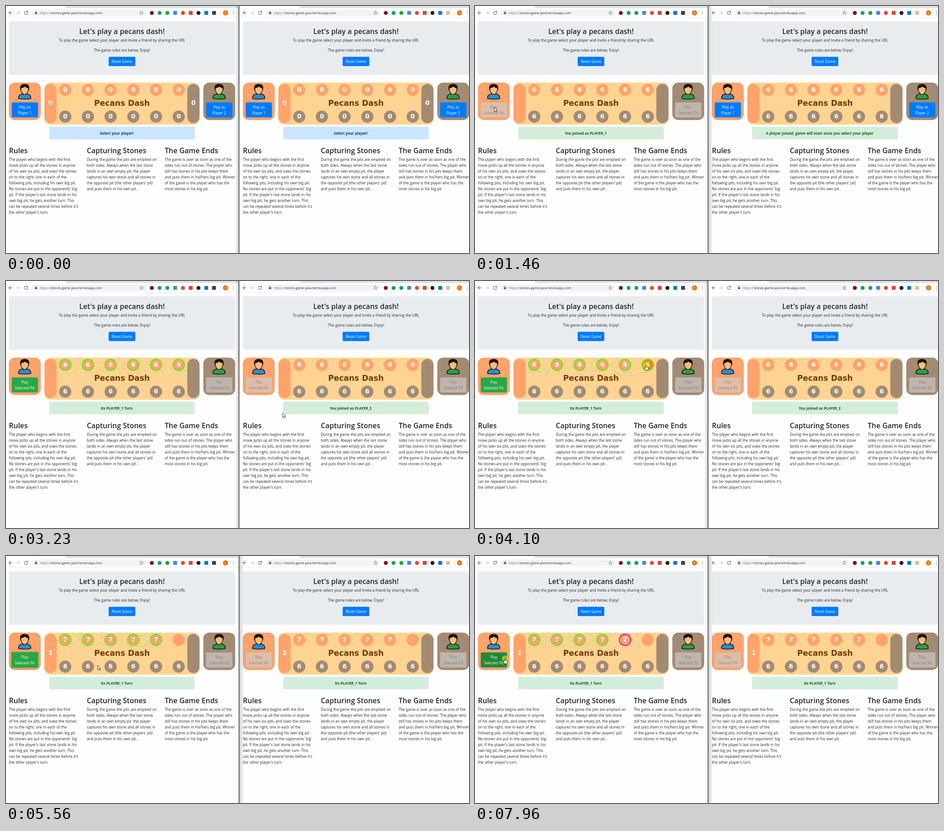
Write an HTML page with a canvas that moves like this. It is 1024x547 px and loops after 8000 ms.

```html
<!DOCTYPE html>
<html lang="en">
<head>
<meta charset="utf-8">
<style>
  html, body { margin: 0; width: 100%; height: 100%; overflow: hidden; background: #fefefe; }
  canvas { display: block; width: 1024px; height: 547px; }
</style>
</head>
<body>
<canvas id="stage" width="1024" height="547"></canvas>
<script>
const g = document.getElementById('stage').getContext('2d');
const LOOP = 8000, PANE = 517.5, TICK = 78.4;
const SANS = '"Open Sans", "Noto Sans", sans-serif';
const WIDE = '"DejaVu Sans", Verdana, sans-serif';
const ORANGE = '#ffa36b', BROWN = '#a38b73', INK = '#212529';
const BODY = 8.08;
const PITS = Array.from({ length: 6 }, (_, i) => 131 + 50.2 * i);

// Moments of the story, in ms
const CLICK = { join1: 1060, join2: 2610, pit6: 4020, play: 5060, pit5: 6790, again: 7960 };
const JOINED = 1460, STARTED = 2930, MOVED = 5300, REACT = 90;

// Pointer moves: start, end and where each one comes to rest
const MOVES = [
  { from: 120, to: 910, x: 43, y: 224 },
  { from: 1690, to: 2530, x: 985, y: 232, sag: 36 },
  { from: 3010, to: 3230, x: 613, y: 293 },
  { from: 3230, to: 3890, x: 378, y: 186 },
  { from: 4250, to: 5000, x: 64, y: 238 },
  { from: 5330, to: 6010, x: 731, y: 257 },
  { from: 6010, to: 6700, x: 327, y: 184 },
  { from: 7020, to: 7560, x: 66, y: 227 }
];

const COLUMNS = [
  ['Rules', ['The player who begins with the first', 'move picks up all the stones in anyone',
    'of his own six pits, and sows the stones', 'on to the right, one in each of the',
    'following pits, including his own big pit.', "No stones are put in the opponents' big",
    "pit. If the player's last stone lands in his", 'own big pit, he gets another turn. This',
    "can be repeated several times before it's", "the other player's turn."]],
  ['Capturing Stones', ['During the game the pits are emptied on', 'both sides. Always when the last stone',
    'lands in an own empty pit, the player', 'captures his own stone and all stones in',
    "the opposite pit (the other players' pit)", 'and puts them in his own pit. .']],
  ['The Game Ends', ['The game is over as soon as one of the', 'sides run out of stones. The player who',
    'still has stones in his pits keeps them', 'and puts them in his/hers big pit. Winner',
    'of the game is the player who has the', 'most stones in his big pit.']]];

const between = (t, a, b) => t >= a && t < b;

function paint(path, fill, stroke, line) {
  if (fill) { g.fillStyle = fill; g.fill(path); }
  if (stroke) { g.strokeStyle = stroke; g.lineWidth = line; g.stroke(path); }
}

function box(x, y, w, h, r, fill, stroke, line = 0.6) {
  const p = new Path2D();
  p.roundRect(x, y, w, h, r);
  paint(p, fill, stroke, line);
}

function disc(x, y, r, fill, stroke, line = 2.1) {
  const p = new Path2D();
  p.arc(x, y, r, 0, 7);
  paint(p, fill, stroke, line);
}

function shape(d, fill, stroke, line) {
  paint(new Path2D(d), fill, stroke, line);
}

function text(s, x, y, size = BODY, color = INK, align = 'left', weight = 400, family = SANS) {
  g.font = `${weight} ${size}px ${family}`;
  g.wordSpacing = '0.26px';
  g.fillStyle = color;
  g.textAlign = align;
  g.fillText(s, x, y);
}

function pointerAt(time) {
  const t = 120 + Math.floor((time - 120) / TICK + 0.35) * TICK;
  let x = 905, y = 560;
  for (const m of MOVES) {
    if (t < m.from) break;
    const u = Math.min(1, (t - m.from) / (m.to - m.from));
    const ease = u * u * (3 - 2 * u);
    x += (m.x - x) * ease;
    y += (m.y - y) * ease + (m.sag || 0) * Math.sin(Math.PI * u);
  }
  return { x, y };
}

function toolbar(right) {
  g.fillStyle = '#fff';
  g.fillRect(0, 0, 520, 25);
  g.fillStyle = '#dee1e6';
  g.fillRect(132, 0, 390, 4.5);
  g.fillRect(0, 24.8, 520, 0.6);
  g.lineCap = 'round';
  shape('M14 15H7M10 11.7L6.7 15L10 18.3', null, '#5f6368', 1.1);
  shape('M23 15H30M27 11.7L30.3 15L27 18.3', null, '#c4c6c9', 1.1);
  shape('M47.2 13A3.6 3.6 0 1 0 47.8 16M48 11V13.8H45.2', null, '#5f6368', 1.1);
  box(57, 8, 253, 14, 7, '#f1f3f4');
  box(64, 14, 5, 4, 0.5, '#5f6368');
  shape('M65 14V13A1.5 1.5 0 0 1 68 13V14', null, '#5f6368', 0.8);
  text('https://', 74.5, 18, 7.2, '#70757a');
  text('stones-game-java.herokuapp.com', 74.5 + g.measureText('https://').width, 18, 7.2, '#2b2e32');
  shape('M299.5 11L300.6 13.8L303.6 14L301.3 15.9L302 18.8L299.5 17.2L297 18.8L297.7 15.9L295.4 14L298.4 13.8Z',
    null, '#5f6368', 0.7);
  const marks = ['#7d1515', '#12a35f', '#16a64a', '#4a86e0', '#e8472b', '#db4035', '#222', '#0a7bc2',
    right ? '#e3bf94' : '#4a3658'];
  marks.forEach((c, i) => {
    const x = 322.5 + i * 17.2;
    if ([3, 5, 7, 8].includes(i)) box(x - 4.3, 11, 8.6, 8.6, 1, c);
    else disc(x, 15.3, 4.4, c);
  });
  g.fillStyle = '#d5d7da';
  g.fillRect(473, 10, 0.7, 10);
  disc(485.5, 15.2, 5.6, '#ef6c00');
  text('R', 485.5, 17.5, 6.3, '#fff', 'center');
  for (const y of [12, 15.2, 18.4]) disc(503, y, 0.8, '#5f6368');
}

function person(x, shirt) {
  const line = '#14100e';
  g.save();
  g.translate(x, 172);
  shape('M-13.5 33C-14 26 -11 24.5 -5 22.5H5C11 24.5 14 26 13.5 33Q0 35.5 -13.5 33Z', shirt, line, 1.5);
  shape('M-5 22L0 28L5 22V18H-5Z', '#f2b066', line, 0.8);
  shape('M-8.5 11C-8.5 18 -4.5 24 0 24S8.5 18 8.5 11C8.5 -2 -8.5 -2 -8.5 11Z', '#f8bd7c', line, 1.3);
  shape('M-9.5 15C-12 5 -8 0.8 0 0.8S12 5 9.5 15L7.5 10Q3 9.5 1 6.5Q-3 9.5 -7.5 10Z', '#1b1512');
  g.restore();
}

function card(x, n, kind, over, focus) {
  const left = n === 1;
  box(x, 169.8, 70.2, 82.6, 13, left ? ORANGE : BROWN);
  box(x + 0.3, 170.1, 69.6, 82, 12.7, null, 'rgba(0,0,0,.14)');
  person(x + 34.8, left ? '#2590d8' : '#20a447');
  const styles = {
    join: [over ? '#0069d9' : '#007bff', '#fff', 'rgba(0,123,255,.5)'],
    play: [over ? '#218838' : '#28a745', '#fff', 'rgba(40,167,69,.6)'],
    off: ['#ccc', '#666']
  };
  const [fill, ink, halo] = styles[kind];
  if (focus) box(x + 4.4, 211.8, 61.6, 36.8, 3, halo);
  g.globalAlpha = kind === 'off' ? 0.65 : 1;
  box(x + 6.2, 213.5, 58, 33.3, 2.2, fill, kind === 'off' ? '#aaa' : null);
  const lines = kind === 'join' ? ['Play as', 'Player ' + n] : ['Play', 'Selected Pit'];
  lines.forEach((s, i) => text(s, x + 35, 226.8 + 13 * i, BODY, ink, 'center'));
  g.globalAlpha = 1;
}

function digits(n, x, y) {
  text(n, x, y, 13.8, '#fff', 'center', 700, WIDE);
}

function pane(s) {
  toolbar(s.right);
  box(6.5, 34, 500, 118.5, 3, '#e9ecef');
  text("Let's play a pecans dash!", 256.5, 62, 15.85, INK, 'center', 600);
  text('To play the game select your player and Invite a friend by sharing the URL', 256.5, 79.4, BODY, INK, 'center');
  text('The game rules are below, Enjoy!', 256.5, 101, BODY, INK, 'center');
  box(227, 112.5, 59, 20.5, 2.2, '#007bff');
  text('Reset Game', 256.5, 126, BODY, '#fff', 'center');

  card(6.5, 1, s.kind1, s.over === 'b1', s.focus === 1);
  card(436.5, 2, s.kind2, s.over === 'b2', s.focus === 2);

  box(84.8, 169.8, 343.4, 93, 13.5, '#ffd391');
  box(85, 172.5, 27, 87, 13.5, ORANGE);
  box(401, 172.5, 27, 87, 13.5, BROWN);
  digits(s.big1, 98.5, 219.3);
  digits(s.big2, 414.5, 219.3);
  PITS.forEach((x, i) => {
    disc(x, 185.7, 13.5, s.over === i ? '#ff7f2a' : ORANGE);
    if (s.picked === i) disc(x, 185.7, 12.6, null, '#f800b8');
    else if (s.rings && s.top[i]) disc(x, 185.7, 12.6, null, '#4bfa05');
    disc(x, 245, 13.5, BROWN);
    digits(s.top[i], x, 189.5);
    digits(s.low, x, 248.6);
  });
  text('Pecans Dash', 256.5, 221.2, 17.2, '#703a06', 'center', 700, WIDE);

  const [fill, edge, ink] = s.joined ? ['#d4edda', '#c3e6cb', '#155724'] : ['#cce5ff', '#b8daff', '#004085'];
  box(96, 267.8, 321, 27, 2, fill, edge);
  text(s.note, 244.8, 284.6, 8, ink, 'center', 700);

  COLUMNS.forEach(([title, lines], c) => {
    const x = 6.5 + 172.2 * c;
    text(title, x, 326.2, 15.85, INK, 'left', 600);
    lines.forEach((line, i) => text(line, x, 343.4 + i * 12.95));
  });
}

function hoverTarget(p, s) {
  const x = p.x - (s.right ? PANE : 0);
  const inButton = left => between(x, left, left + 58) && between(p.y, 213.5, 247);
  if (s.kind1 !== 'off' && inButton(12.7)) return 'b1';
  if (s.kind2 !== 'off' && inButton(442.7)) return 'b2';
  return s.rings ? PITS.findIndex((c, i) => s.top[i] && Math.hypot(x - c, p.y - 185.7) < 13) : -1;
}

function states(t) {
  const joined = t >= JOINED, started = t >= STARTED, moved = t >= MOVED;
  const shared = {
    joined, big1: moved ? 1 : joined ? '' : 0, big2: joined ? '' : 0, low: joined ? 6 : 0,
    top: PITS.map((_, i) => moved ? (i < 5 ? 7 : '') : joined ? 6 : 0)
  };
  const turn = 'Its PLAYER_1 Turn', select = 'Select your player!';
  const pit5 = CLICK.pit5 + REACT;
  return [{
    ...shared, right: false, rings: started,
    kind1: started ? 'play' : joined ? 'off' : 'join', kind2: joined ? 'off' : 'join',
    focus: between(t, CLICK.join1 + REACT, JOINED) || between(t, CLICK.play + REACT, pit5) ? 1 : 0,
    picked: between(t, CLICK.pit6 + REACT, MOVED) ? 5 : t >= pit5 ? 4 : -1,
    note: started ? turn : joined ? 'You joined as PLAYER_1' : select
  }, {
    ...shared, right: true, rings: false,
    kind1: started ? 'off' : 'join', kind2: started ? 'off' : 'join',
    focus: between(t, CLICK.join2 + REACT, STARTED) ? 2 : 0, picked: -1,
    note: moved ? turn : started ? 'You joined as PLAYER_2'
      : joined ? 'A player joined, game will start once you select your player' : select
  }];
}

function divider(rightActive) {
  const [from, to] = rightActive ? [515, 507] : [516, 526];
  const shade = g.createLinearGradient(from, 0, to, 0);
  shade.addColorStop(0, 'rgba(0,0,0,.2)');
  shade.addColorStop(1, 'rgba(0,0,0,0)');
  g.fillStyle = shade;
  g.fillRect(Math.min(from, to), 0, Math.abs(to - from), 547);
  g.fillStyle = '#3c3f43';
  g.fillRect(514.6, 0, 1.6, 547);
}

function pointer(p, hand) {
  g.save();
  g.translate(p.x, p.y);
  g.lineJoin = 'round';
  if (hand) shape('M-1 0.8Q0 -0.8 1 0.8V4.2L4.6 5Q5.6 5.4 5.4 7L4.6 11.5H-0.8L-3.6 7.4Q-3.6 5.6 -1 7.2Z',
    '#fff', '#111', 0.8);
  else shape('M0 0V9.8L2.3 7.8L3.9 11L5.4 10.3L3.9 7.2H7Z', '#fff', '#111', 0.8);
  g.restore();
}

function draw(now) {
  const t = now % LOOP, p = pointerAt(t);
  const [left, right] = states(t);
  const active = p.x < 515 ? left : right;
  active.over = hoverTarget(p, active);

  g.fillStyle = '#fefefe';
  g.fillRect(0, 0, 1024, 547);
  for (const s of [left, right]) {
    g.save();
    g.beginPath();
    g.rect(s.right ? 516 : 0, 0, s.right ? 508 : 515, 547);
    g.clip();
    if (s.right) g.translate(PANE, 0);
    pane(s);
    g.restore();
  }
  divider(t < CLICK.join1 + REACT || between(t, CLICK.join2 + REACT, CLICK.pit6 + REACT));
  if (Object.values(CLICK).some(c => between(t, c, c + 150))) disc(p.x, p.y, 6.5, 'rgba(240,230,0,.6)');
  pointer(p, active.over !== -1);
  requestAnimationFrame(draw);
}
requestAnimationFrame(draw);
</script>
</body>
</html>
```
